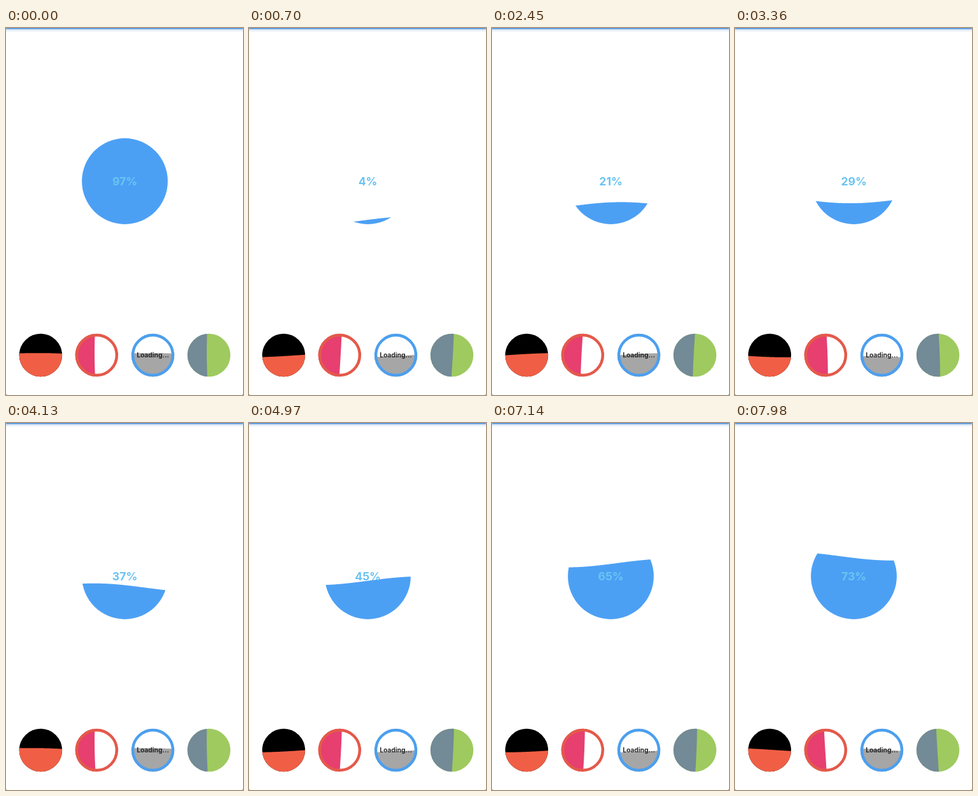
An HTML page that plays this animation: 372 by 576 pixels, repeating every 8 s.

```html
<!DOCTYPE html>
<html lang="en">
<head>
<meta charset="utf-8">
<title>Liquid progress</title>
<style>
  html, body { margin: 0; width: 100%; height: 100%; overflow: hidden; background: #666; }
  svg { display: block; width: 372px; height: 576px; }
  text { font-family: Inter, "Liberation Sans", sans-serif; font-weight: 700; text-anchor: middle; }
</style>
</head>
<body>
<svg id="stage" viewBox="0 0 372 576">
  <defs>
    <linearGradient id="shadow" x1="0" y1="0" x2="0" y2="1">
      <stop offset="0" stop-color="#a9c8ea"/>
      <stop offset=".4" stop-color="#e4edf7"/>
      <stop offset="1" stop-color="#fff"/>
    </linearGradient>
  </defs>
  <rect width="372" height="576" rx="2" fill="#fff"/>
  <rect y="1" width="372" height="6" fill="url(#shadow)"/>
  <rect x="1" width="370" height="1.4" fill="#4a90dc"/>
  <g id="gauges"></g>
  <text id="percent" x="186.6" y="247" font-size="17.6" fill="#6bc3f2"></text>
  <text x="230.5" y="517" font-size="10.3" fill="#262626">Loading...</text>
</svg>
<script>
const LOOP = 8000, STEP = 70;
const FILL_TIME = 10500, START_VALUE = 0.9735;
const WAVE_TIME = 2100, START_ANGLE = 303;
const SCALE = 372 / 414;   // screen pixels per layout unit
const BORDER = 5 * SCALE;

const gauges = [
  { x: 186.5, y: 240.5, size: 150, back: '#fff', fill: '#4ca0f4' },
  { x: 54.4, y: 513.5, size: 75, back: '#000', fill: '#f05f45', value: 0.5 },
  { x: 142.4, y: 513.5, size: 75, back: '#fff', fill: '#e63f70', value: 0.5, border: '#e4594a', sideways: true },
  { x: 230.5, y: 513.5, size: 75, back: '#fff', fill: '#a6a6a6', value: 0.5, border: '#4c9fee' },
  { x: 318.5, y: 513.5, size: 75, back: '#9fca5f', fill: '#738a97', value: 0.5, sideways: true }
];
const root = document.getElementById('gauges');
const percent = document.getElementById('percent');

function add(parent, tag, attrs) {
  const node = document.createElementNS('http://www.w3.org/2000/svg', tag);
  for (const key in attrs) node.setAttribute(key, attrs[key]);
  return parent.appendChild(node);
}

gauges.forEach((g, n) => {
  const r = g.size / 2;
  const group = add(root, 'g', {
    transform: `translate(${g.x} ${g.y}) scale(${SCALE}) translate(${-r} ${-r})`
  });
  const clip = add(group, 'clipPath', { id: 'round' + n });
  add(clip, 'circle', { cx: r, cy: r, r });
  add(group, 'circle', { cx: r, cy: r, r, fill: g.back });
  g.wave = add(group, 'path', { fill: g.fill, 'clip-path': `url(#round${n})` });
  if (g.border) {
    add(group, 'circle', {
      cx: r, cy: r, r: r - BORDER / SCALE / 2,
      fill: 'none', stroke: g.border, 'stroke-width': BORDER / SCALE
    });
  }
});

function wavePath({ size, sideways }, value, angle) {
  const points = [];
  const level = sideways ? size * value : size * (1 - value);
  for (let i = -2; i <= size + 2; i++) {
    const edge = level + Math.sin((angle - i) * Math.PI / 180) * size / 20;
    points.push(sideways ? [edge, i] : [i, edge]);
  }
  const end = size + 2;
  points.push(...(sideways ? [[-2, end], [-2, -2]] : [[end, end], [-2, end]]));
  return 'M' + points.map(p => p.map(c => c.toFixed(2)).join(' ')).join('L') + 'Z';
}

function draw(time) {
  const t = Math.floor(time % LOOP / STEP) * STEP;
  const progress = (START_VALUE + t / FILL_TIME) % 1;
  const angle = START_ANGLE + 360 * t / WAVE_TIME;
  for (const g of gauges) g.wave.setAttribute('d', wavePath(g, g.value ?? progress, angle));
  percent.textContent = Math.round(progress * 100) + '%';
}

function tick() {
  draw(performance.now());
  requestAnimationFrame(tick);
}
tick();
</script>
</body>
</html>
```
